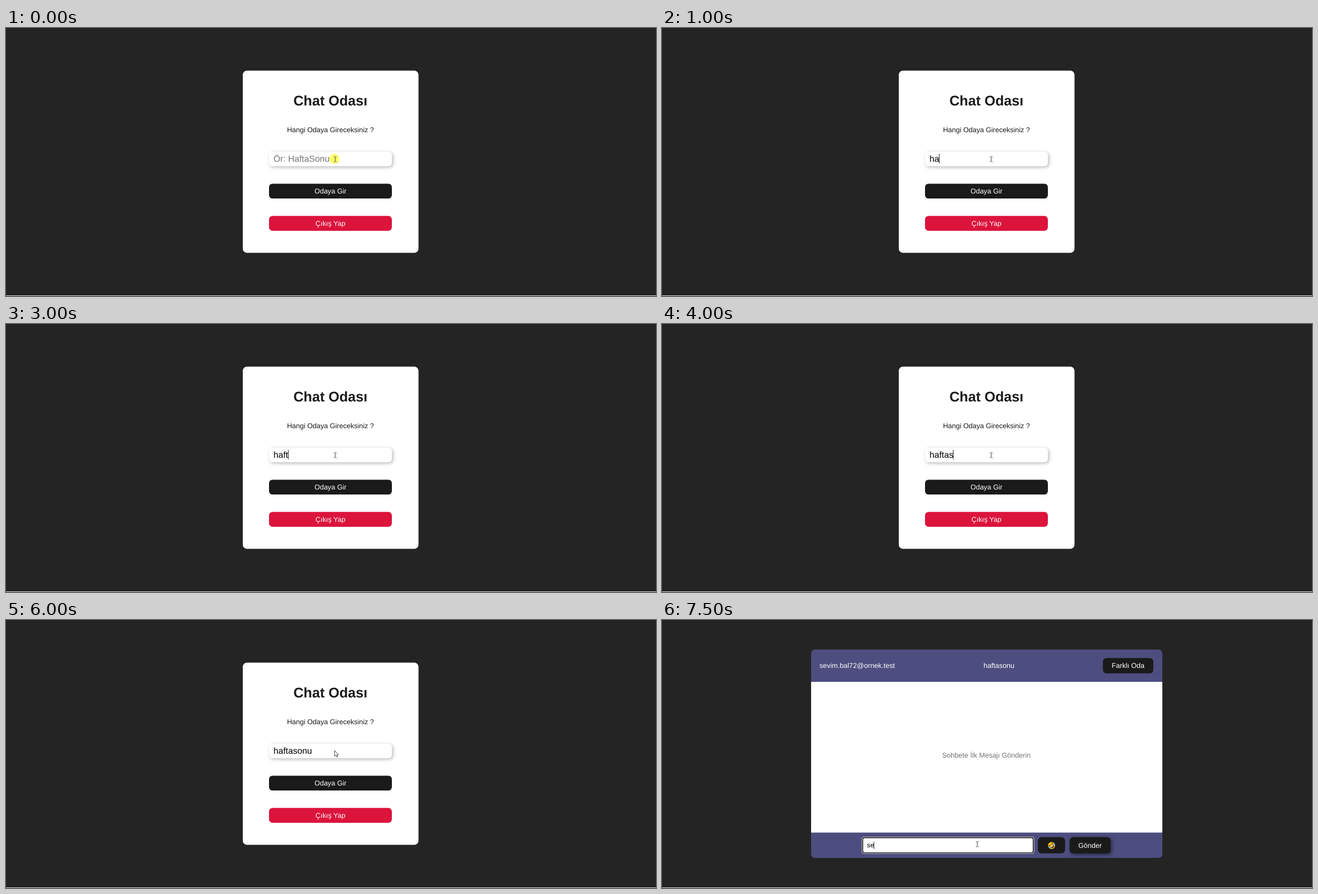
Write an HTML page that moves like this. It is 1164 px wide and 481 px high and loops after 8 s.

```html
<!DOCTYPE html>
<html lang="tr">
<head>
<meta charset="utf-8">
<title>Chat Odası</title>
<style>
  html, body { margin: 0; width: 100%; height: 100%; overflow: hidden; background: #242424; }
  svg { display: block; width: 1164px; height: 481px; }
  text { font: 12.57px Arial, "Liberation Sans", sans-serif; fill: #fff; text-rendering: geometricPrecision; white-space: pre; }
  .mid { text-anchor: middle; }
  .dark { fill: #1a1a1a; }
  .field { filter: drop-shadow(2px 2px 3px rgba(0, 0, 0, .28)); }
  .send { filter: drop-shadow(2px 2px 3px rgba(0, 0, 0, .55)); }
  .hint { fill: #757575; }
  .glow { fill: #ffff69; mix-blend-mode: multiply; }
  #roomText { font-size: 15.71px; }
  #msgText { font-size: 11.79px; }
</style>
</head>
<body>
<svg viewBox="0 0 1164 481">
  <defs>
    <path id="beam" d="M-2.5 -4.5H-.6M.6 -4.5H2.5M-2.5 4.5H-.6M.6 4.5H2.5M0 -4.2V4.2" fill="none" stroke="#4a4a4a"/>
    <path id="arrow" d="M0 0V10L2.4 7.9L4 11.6L5.6 10.9L4.1 7.3H7Z" fill="#fff" stroke="#333" stroke-width=".9" stroke-linejoin="round"/>
  </defs>
  <rect width="1164" height="481" fill="#242424"/>
  <rect y="480" width="1164" height="1" fill="#e2e0e0"/>

  <g id="login">
    <rect x="424" y="76.5" width="314.7" height="327" rx="7.5" fill="#fff"/>
    <text class="mid dark" x="581" y="139" style="font-size:25.14px;font-weight:700">Chat Odası</text>
    <text class="mid dark" x="581" y="187.2">Hangi Odaya Gireceksiniz ?</text>
    <rect class="field" x="471" y="222" width="220" height="26" rx="6.3" fill="#fff"/>
    <rect class="dark" x="471" y="279.4" width="220" height="26.6" rx="6.3"/>
    <text class="mid" x="581" y="297">Odaya Gir</text>
    <rect x="471" y="337.3" width="220" height="26.6" rx="6.3" fill="#dc143c"/>
    <text class="mid" x="581" y="355">Çıkış Yap</text>
    <text id="roomText" x="479" y="240"></text>
    <rect id="roomCaret" y="226" width="1" height="17" fill="#222"/>
    <circle id="roomGlow" class="glow" cx="588" cy="235" r="9"/>
    <use id="roomBeam" href="#beam" x="589.5" y="235.5"/>
    <use id="roomArrow" href="#arrow" x="588.4" y="234.4"/>
  </g>

  <g id="chat">
    <rect x="267" y="53" width="629" height="374" rx="7" fill="#4d4d7f"/>
    <rect x="267" y="111" width="629" height="270.5" fill="#fff"/>
    <text x="282" y="86.4">sevim.bal72@ornek.test</text>
    <text class="mid" x="603.4" y="86.4">haftasonu</text>
    <rect class="dark" x="789.6" y="68.3" width="90.3" height="27.5" rx="6.3"/>
    <text class="mid" x="834.7" y="86.4">Farklı Oda</text>
    <text class="mid hint" x="581" y="246.5">Sohbete İlk Mesajı Gönderin</text>

    <rect x="357.8" y="389" width="308.6" height="30.6" rx="4.5" fill="#fff"/>
    <rect x="359.4" y="390.6" width="305.4" height="27.4" rx="3.2" fill="#fff" stroke="#101010" stroke-width="1.6"/>
    <rect class="dark" x="673.2" y="389.8" width="48.6" height="29" rx="6.3"/>
    <g transform="translate(697.6 404.7) rotate(-38)">
      <circle r="6.3" fill="#fcc21b"/>
      <path d="M-4 .6H4A4 4.4 0 0 1 -4 .6Z" fill="#6b3a2a"/>
      <path d="M-3.5 .8H3.5L3.1 2H-3.1Z" fill="#fff"/>
      <path d="M-4.3 -3.2L-1.7 -2L-4.3 -.8M4.3 -3.2L1.7 -2L4.3 -.8" fill="none" stroke="#5a3a20" stroke-width="1"/>
      <ellipse cx="-5.1" cy="1.2" rx="1.3" ry="2" fill="#4faee8"/>
      <ellipse cx="5.1" cy="1.2" rx="1.3" ry="2" fill="#4faee8"/>
    </g>
    <rect class="dark send" x="730" y="389.8" width="73.2" height="29" rx="6.3"/>
    <text class="mid" x="766.5" y="408.5">Gönder</text>

    <text id="msgText" x="367" y="408.4"></text>
    <rect id="msgCaret" y="398" width="1" height="13" fill="#222"/>
    <circle id="msgGlow" class="glow" cx="562.8" cy="401.5" r="9.3"/>
    <use href="#beam" x="564.5" y="402.5"/>
  </g>
</svg>
<script>
  const LOOP = 8000;
  const $ = id => document.getElementById(id);
  const show = (id, on) => { $(id).style.display = on ? "" : "none"; };

  // start time, typed text, caret, highlight, arrow pointer
  const roomSteps = [
    [0, "", false, true, false],
    [500, "", true, false, false],
    [1000, "ha", true, false, false],
    [2000, "haf", true, false, false],
    [3000, "haft", true, false, false],
    [4000, "haftas", true, false, false],
    [4500, "haftaso", true, false, false],
    [5000, "haftason", true, false, false],
    [6000, "haftasonu", false, false, true]
  ];
  const chatSteps = [
    [6500, "", true, true],
    [7000, "", true, false],
    [7500, "se", true, false]
  ];

  const stepAt = (steps, t) => steps.filter(s => s[0] <= t).pop();

  function drawField(name, left, value, hint, caret, glow) {
    const text = $(name + "Text");
    text.textContent = value || hint;
    text.style.fill = value ? "#000" : "#757575";
    const width = value ? text.getComputedTextLength() : 0;
    $(name + "Caret").setAttribute("x", Math.floor(left + width));
    show(name + "Caret", caret);
    show(name + "Glow", glow);
  }

  let last = null;
  function frame() {
    const t = performance.now() % LOOP;
    const inChat = t >= chatSteps[0][0];
    const step = stepAt(inChat ? chatSteps : roomSteps, t);
    if (step !== last) {
      last = step;
      show("login", !inChat);
      show("chat", inChat);
      const [, value, caret, glow, arrow] = step;
      if (inChat) {
        drawField("msg", 367, value, "Mesajınızı Yazınız", caret, glow);
      } else {
        drawField("room", 479, value, "Ör: HaftaSonu", caret, glow);
        show("roomBeam", !arrow);
        show("roomArrow", arrow);
      }
    }
    requestAnimationFrame(frame);
  }
  frame();
</script>
</body>
</html>
```
